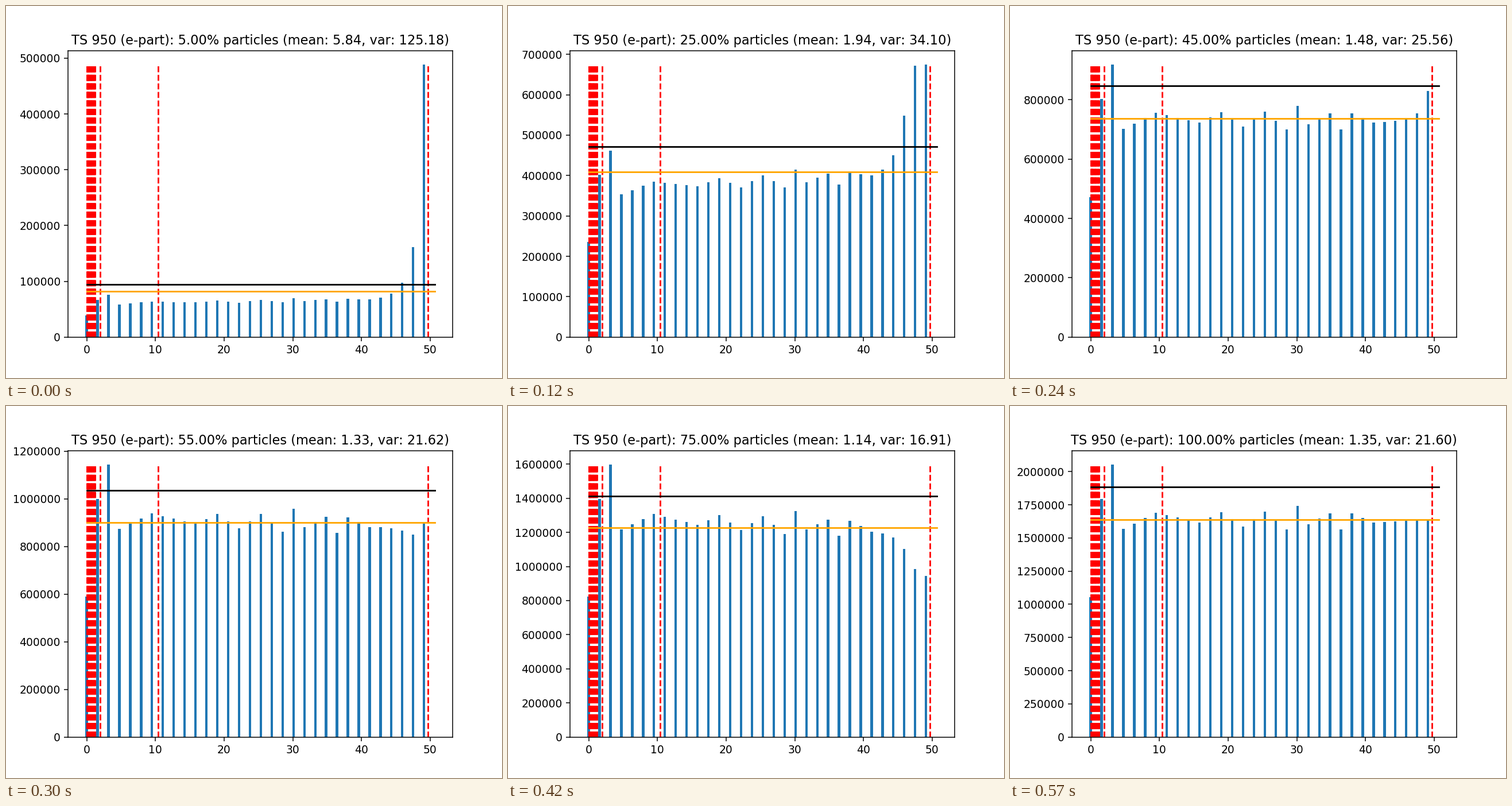
A matplotlib script that plays this animation: 864 px wide and 648 px high, repeating every 600 ms.

```python
import numpy as np
import matplotlib.pyplot as plt
from matplotlib.animation import FuncAnimation

plt.rcParams["text.kerning_factor"] = 6

FRAMES = 20
BINS = np.arange(32)
SPAN = 50.69
WIDTH = 0.36
MEAN_LOAD = 1638e3

# Turning points of the final profile, in thousands
TURNS = [0, 1, 2, 3, 6, 10, 12, 14, 16, 18, 19, 20, 22, 23, 24, 26, 31]
LEVELS = [1055, 1793, 2055, 1568, 1690, 1616, 1694, 1586, 1698,
          1564, 1741, 1605, 1685, 1564, 1685, 1615, 1637]
FULL = 1e3 * np.interp(BINS, TURNS, LEVELS)

# Moments shown in the title; their running sums grow evenly in between
KEYS = np.array([5, 15, 25, 45, 65, 85, 100])
MEANS = np.array([5.84, 2.81, 1.94, 1.48, 1.22, 1.07, 1.35])
VARS = np.array([125.18, 52.74, 34.10, 25.56, 18.87, 15.41, 21.60])

# Dense cluster of boundaries near zero, then three far ones
BOUNDS = np.append(1.23 * np.linspace(0, 1, 29) ** 1.3, [1.96, 10.43, 49.68])


def heights(pct):
    """Even fill with a slight tilt; the last bins overfill, then lag."""
    p = pct / 100
    tilt = np.interp(pct, [5, 15, 45, 65, 85, 100],
                     [0.09, 0.11, -0.001, -0.032, -0.0275, 0])
    surplus = np.interp(pct, [25, 45, 65], [1, 0.03, 0])
    lag = np.interp(pct, [45, 65, 85, 100], [0, 0.145, 0.31, 0])

    dist = BINS[::-1]
    room = max(0, 0.403 + 2.5 * p ** 4 - 0.99 * p)
    peak = 5.14 * surplus * p * np.exp(-1.5 * dist ** 0.82)
    tail = np.minimum(peak, room) - lag * p / (1 + (dist / 1.8) ** 3)

    # The bulk takes whatever the tail leaves over
    bulk = FULL * (1 + tilt * (BINS - 15.5) / 22)
    level = (p * FULL.sum() - (tail * FULL).sum()) / bulk.sum()
    return level * bulk + tail * FULL


def stats(pct):
    mean = np.interp(pct, KEYS, MEANS * KEYS) / pct
    square = np.interp(pct, KEYS, (VARS + MEANS ** 2) * KEYS) / pct
    return mean, square - mean ** 2


fig, ax = plt.subplots(figsize=(6.4, 4.8), dpi=135)


def draw(k):
    pct = 100 * (k + 1) / FRAMES
    bars = heights(pct)
    top = bars.max()
    load = MEAN_LOAD * pct / 100
    mean, var = stats(pct)

    ax.clear()
    ax.bar(BINS * SPAN / len(BINS), bars, WIDTH, color="tab:blue")
    ax.vlines(BOUNDS, 0, top, colors="red", linestyles="dashed", linewidth=1.5)
    for scale, color in (1, "orange"), (1.15, "black"):
        ax.plot([0, SPAN], [scale * load] * 2, color=color, lw=1.5)

    pad = 0.05 * (SPAN + WIDTH / 2)
    ax.set_xlim(-WIDTH / 2 - pad, SPAN + pad)
    ax.set_ylim(0, 1.05 * top)
    ax.ticklabel_format(axis="y", style="plain", useOffset=False)
    ax.set_title(f"TS 950 (e-part): {pct:.2f}% particles "
                 f"(mean: {mean:.2f}, var: {var:.2f})")
    return []


anim = FuncAnimation(fig, draw, frames=FRAMES, interval=30,
                     init_func=lambda: [], repeat=True, repeat_delay=0)
plt.show()
```
